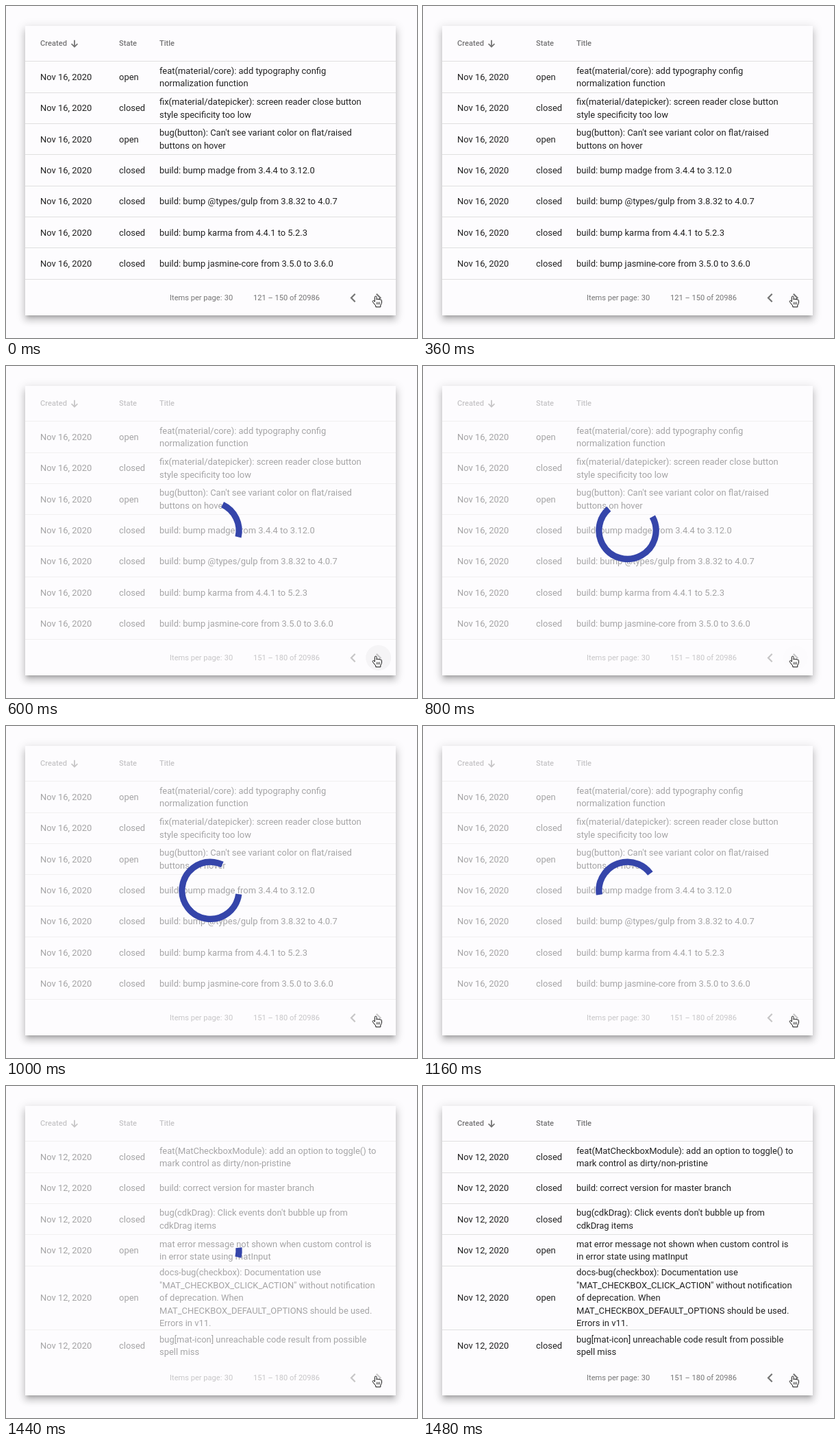
An HTML page that plays this animation: 600x484 px, repeating every 1.8 s.

```html
<!DOCTYPE html>
<html lang="en">
<head>
<meta charset="utf-8">
<title>Loading table</title>
<style>
  html, body { margin: 0; width: 100%; height: 100%; overflow: hidden; background: #fdfcfe; }
  .card {
    position: absolute; left: 28px; top: 28.5px; width: 541px; height: 422px; background: #fdfcfe;
    box-shadow: 0 4.6px 4.6px -2.8px rgba(0,0,0,.2), 0 7.4px 9.2px .9px rgba(0,0,0,.14), 0 2.8px 13px 1.8px rgba(0,0,0,.12);
  }
  svg { position: absolute; left: 0; top: 0; }
  text { font: 12.95px Roboto, Arial, sans-serif; fill: rgba(0,0,0,.87); }
  .head text { font-size: 11.1px; font-weight: 500; fill: rgba(0,0,0,.54); }
  .foot text { font-size: 11.1px; fill: rgba(0,0,0,.54); }
  .rule { fill: #e0e0e0; }
</style>
</head>
<body>
<div class="card"></div>
<svg width="600" height="484" viewBox="0 0 600 484">
  <clipPath id="button"><circle cx="543.7" cy="425.4" r="18.5"/></clipPath>
  <g id="content">
    <g class="head">
      <text x="50" y="58.4">Created</text>
      <text x="165" y="58.4">State</text>
      <text x="224" y="58.4">Title</text>
      <path d="M100 49.8V59.6M95.6 55.2L100 59.6L104.4 55.2" fill="none" stroke="#757575" stroke-width="1.8"/>
      <rect class="rule" x="28" y="80" width="541" height="1"/>
    </g>
    <g id="before"></g>
    <g id="after"></g>
    <g class="foot">
      <text x="239" y="428.5">Items per page:</text>
      <text x="318.7" y="428.5">30</text>
      <text id="range" x="361" y="428.5"></text>
      <g fill="#757575">
        <path transform="translate(493.8 412.5) scale(1.079)" d="M15.41 7.41L14 6l-6 6 6 6 1.41-1.41L10.83 12z"/>
        <path transform="translate(530.8 412.5) scale(1.079)" d="M10 6L8.59 7.41 13.17 12l-4.58 4.59L10 18l6-6z"/>
      </g>
      <circle id="ripple" cx="543.7" cy="425.4" clip-path="url(#button)"/>
    </g>
  </g>
  <circle id="spinner" r="41.6" pathLength="360" fill="none" stroke="#3545aa" stroke-width="9.3"/>
  <g stroke="#111" stroke-linejoin="round">
    <path fill="#fff" d="M538.3 431.2V424.6q0-1.5 1.4-1.5t1.4 1.5V428.2q.3-1 1.3-1q1.1 0 1.3 1q.3-.7 1.2-.7q1.1 0 1.3 1.1q.3-.5 1-.5q1.3 0 1.3 1.6v2.2q0 1.5-.8 3L546.8 436V438.8H539.8V437L535.6 431.7q-.8-1.2 .1-2q.9-.6 1.9.4z"/>
    <path stroke-width=".8" d="M541.4 431.6v3.6M543.4 431.6v3.6M545.4 431.6v3.6"/>
  </g>
</svg>
<script>
const LOOP = 1800, STEP = 40, LINE = 18.5, ROW = 45.33;
const LOAD = 480, SWAP = 1440, DONE = 1480;
const $ = id => document.getElementById(id);

const pages = {
  before: ['Nov 16, 2020', [
    ['open', 'feat(material/core): add typography config', 'normalization function'],
    ['closed', 'fix(material/datepicker): screen reader close button', 'style specificity too low'],
    ['open', "bug(button): Can't see variant color on flat/raised", 'buttons on hover'],
    ['closed', 'build: bump madge from 3.4.4 to 3.12.0'],
    ['closed', 'build: bump @types/gulp from 3.8.32 to 4.0.7'],
    ['closed', 'build: bump karma from 4.4.1 to 5.2.3'],
    ['closed', 'build: bump jasmine-core from 3.5.0 to 3.6.0']
  ]],
  after: ['Nov 12, 2020', [
    ['closed', 'feat(MatCheckboxModule): add an option to toggle() to', 'mark control as dirty/non-pristine'],
    ['closed', 'build: correct version for master branch'],
    ['closed', "bug(cdkDrag): Click events don't bubble up from", 'cdkDrag items'],
    ['open', 'mat error message not shown when custom control is', 'in error state using matInput'],
    ['open', 'docs-bug(checkbox): Documentation use', '"MAT_CHECKBOX_CLICK_ACTION" without notification',
      'of deprecation. When', 'MAT_CHECKBOX_DEFAULT_OPTIONS should be used.', 'Errors in v11.'],
    ['closed', 'bug[mat-icon] unreachable code result from possible', 'spell miss']
  ]]
};

function add(parent, tag, attrs, text = '') {
  const el = document.createElementNS('http://www.w3.org/2000/svg', tag);
  for (const key in attrs) el.setAttribute(key, attrs[key]);
  el.textContent = text;
  parent.append(el);
}

for (const id in pages) {
  const [date, rows] = pages[id], group = $(id);
  let top = 80.9;
  for (const [state, ...lines] of rows) {
    const height = Math.max(ROW, lines.length * LINE + 0.93);
    const base = top + height / 2 + 4.5;
    add(group, 'text', { x: 50, y: base }, date);
    add(group, 'text', { x: 165, y: base }, state);
    lines.forEach((line, i) =>
      add(group, 'text', { x: 224, y: base + (i - (lines.length - 1) / 2) * LINE }, line));
    top += height;
    if (top < 399) add(group, 'rect', { class: 'rule', x: 28, y: Math.floor(top), width: 541, height: 1 });
  }
}

// CSS-style cubic Bezier easing
function bezier(x1, y1, x2, y2) {
  const at = (a, b, s) => 3 * a * s * (1 - s) ** 2 + 3 * b * s * s * (1 - s) + s ** 3;
  return x => {
    if (x <= 0) return 0;
    if (x >= 1) return 1;
    let lo = 0, hi = 1;
    for (let i = 0; i < 24; i++) {
      const mid = (lo + hi) / 2;
      if (at(x1, x2, mid) < x) lo = mid; else hi = mid;
    }
    return at(y1, y2, lo);
  };
}
const swift = bezier(.35, 0, .25, 1), decelerate = bezier(0, 0, .2, 1);

function draw(t) {
  const loading = t >= LOAD && t < DONE;
  $('content').setAttribute('opacity', loading ? 0.4 : 1);
  $('before').style.display = t < SWAP ? '' : 'none';
  $('after').style.display = t < SWAP ? 'none' : '';
  $('range').textContent = (t < LOAD ? '121 – 150' : '151 – 180') + ' of 20986';

  const enter = decelerate((t - 350) / 225), fade = decelerate((t - 585) / 400);
  $('ripple').setAttribute('r', 26 * enter);
  $('ripple').setAttribute('opacity', t < 880 ? 0.1 * enter * (1 - fade) : 0);

  // The arc grows for half a second, then shrinks towards its other end.
  const turn = -90 + 0.18 * (t - 461), age = t - 484, growing = age < 500;
  const length = growing ? 18 + 270 * swift(age / 500) : 288 - 270 * swift(age / 500 - 1);
  const start = growing ? turn : turn - 72.5 - length;
  const spinner = $('spinner');
  spinner.style.display = loading ? '' : 'none';
  spinner.setAttribute('stroke-dasharray', `${length} 360`);
  spinner.setAttribute('transform', `translate(298.5 239.8) rotate(${start})`);
}

function tick() {
  draw(Math.floor(performance.now() % LOOP / STEP) * STEP);
  requestAnimationFrame(tick);
}
tick();
</script>
</body>
</html>
```
